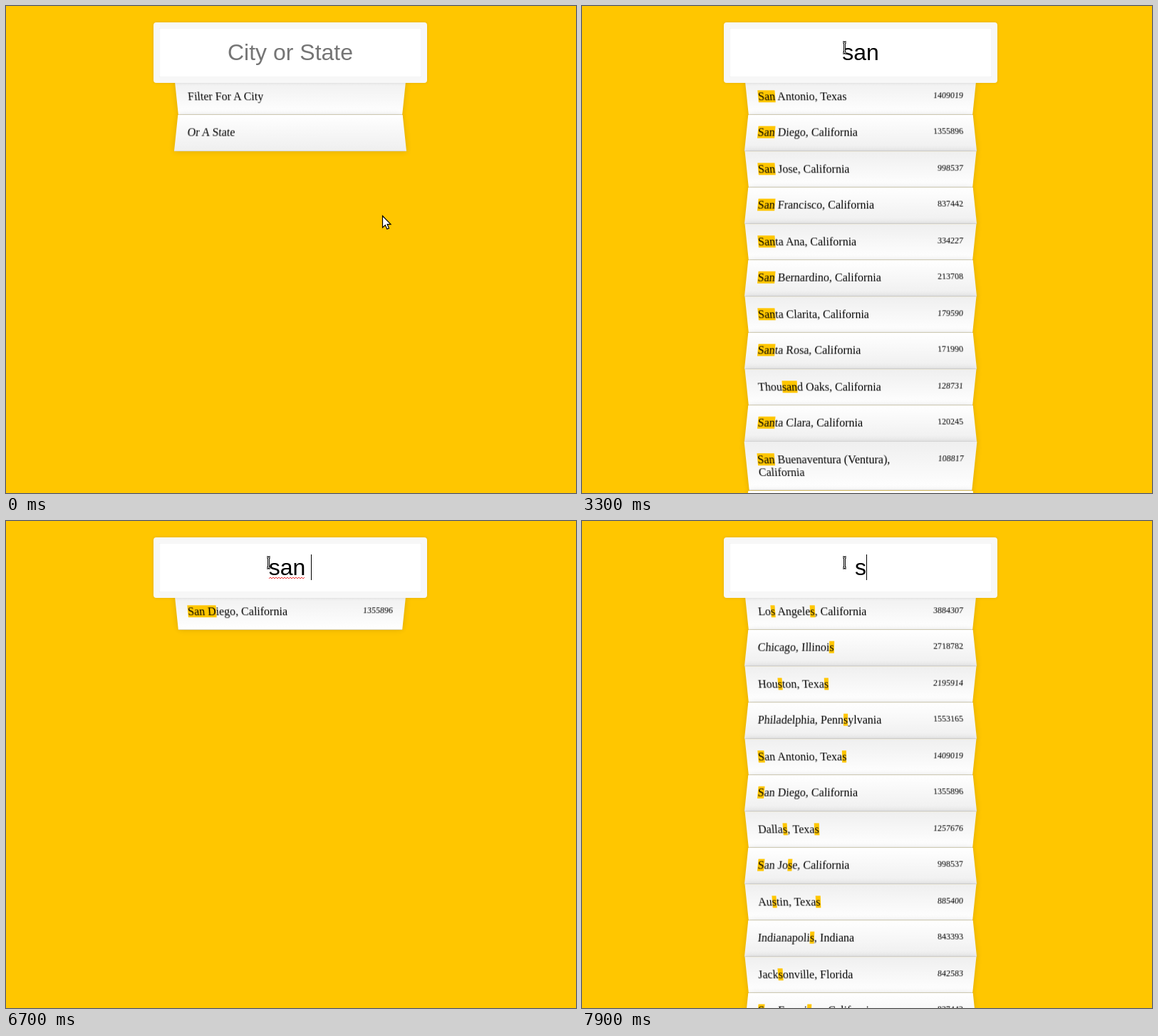
These frames come from a looping animation (800 by 684 pixels, 8 s). An HTML page:

```html
<!DOCTYPE html>
<html lang="en">
<head>
<meta charset="utf-8">
<title>City search</title>
<style>
  * { box-sizing: border-box; }
  html, body { margin: 0; width: 100%; height: 100%; overflow: hidden; background: #ffc600; }
  #stage { position: absolute; left: 0; top: 0; width: 800px; height: 684px; overflow: hidden; }
  #page { position: absolute; left: 0; top: 0; width: 798px; height: 684px; }
  #field {
    position: absolute; z-index: 2; left: 207px; top: 23px; width: 384px; height: 85px;
    background: #fff; border: 8px solid #f7f7f7; border-radius: 4px;
    box-shadow: 0 0 4px rgba(0,0,0,.12), inset 0 0 1.6px rgba(0,0,0,.19);
  }
  #typed {
    position: absolute; z-index: 3; top: 47px; white-space: pre;
    font: 32px/37px "Liberation Sans", Arial, sans-serif; color: #000;
  }
  #typed.empty { color: #757575; }
  #caret { position: absolute; z-index: 3; top: 47px; width: 1px; height: 36px; background: #000; }
  #wave { position: absolute; left: 0; top: 31px; width: 52px; height: 4px; }
  #list {
    position: absolute; left: 239px; top: 100px; width: 320px; margin: 0; padding: 0;
    list-style: none; font: 16px/18px "Liberation Serif", Times, serif; color: #000;
  }
  li {
    display: flex; justify-content: space-between; padding: 16px;
    border-bottom: 1px solid #d8d8d8; box-shadow: 0 0 8px rgba(0,0,0,.14);
  }
  li:nth-child(odd) {
    transform: perspective(80px) rotateX(-3deg) translateY(2.4px);
    background: linear-gradient(to top, #fff, #efefef);
  }
  li:nth-child(even) {
    transform: perspective(80px) rotateX(3deg) translateY(1.6px) scale(1.001);
    background: linear-gradient(to bottom, #fff, #efefef);
  }
  .name { white-space: nowrap; }
  .count { font-size: 12px; line-height: normal; }
  .hl { background: #ffc600; }
  #pointer { position: absolute; z-index: 4; left: 0; top: 0; }
</style>
</head>
<body>
<div id="stage">
  <div id="page">
    <div id="field"></div>
    <div id="typed"></div>
    <div id="caret"></div>
    <ul id="list"></ul>
  </div>
  <svg id="pointer" width="800" height="684" fill="none">
    <path id="arrow" d="M.5 .8V17.2L4.3 13.7L6.8 19.3L9.5 18.1L7.1 12.6H12Z" fill="#fff" stroke="#000" stroke-width="1.2"/>
    <g id="beam">
      <path d="M-2.5 -7H-1L0 -6L1 -7H2.5M0 -6V7M-2.5 8H-1L0 7L1 8H2.5" stroke="#000" stroke-width="3"/>
      <path d="M-2.5 -7H-1L0 -6L1 -7H2.5M0 -6V7M-2.5 8H-1L0 7L1 8H2.5" stroke="#fff" stroke-width="1"/>
    </g>
  </svg>
</div>
<script>
const LOOP = 8000;
const $ = id => document.getElementById(id);

// Sorted by population
const cities = `Los Angeles, California|3884307
Chicago, Illinois|2718782
Houston, Texas|2195914
Philadelphia, Pennsylvania|1553165
San Antonio, Texas|1409019
San Diego, California|1355896
Dallas, Texas|1257676
San Jose, California|998537
Austin, Texas|885400
Indianapolis, Indiana|843393
Jacksonville, Florida|842583
San Francisco, California|837442
Sacramento, California|479686
Kansas City, Missouri|467007
Mesa, Arizona|457587
Tulsa, Oklahoma|398121
Wichita, Kansas|386552
Santa Ana, California|334227
Chesapeake, Virginia|230571
San Bernardino, California|213708
Santa Clarita, California|179590
Santa Rosa, California|171990
Thousand Oaks, California|128731
Santa Clara, California|120245
San Buenaventura (Ventura), California|108817
Santa Maria, California|102216
San Mateo, California|101128
San Angelo, Texas|97492
San Marcos, California|89387
San Leandro, California|87965
San Ramon, California|74513
San Rafael, California|58994`.split('\n').map(row => row.split('|'));

// [ms, typed text, filtered query, caret shown]
const steps = [
  [0, '', '', 0], [900, '', '', 1], [1500, '', '', 0],
  [1700, 's', '', 1], [1900, 's', 's', 1],
  [2100, 'sa', 's', 1], [2200, 'sa', 'sa', 1],
  [2700, 'san', 'sa', 1], [2800, 'san', 'san', 1],
  [3300, 'san', 'san', 0], [3900, 'san', 'san', 1],
  [4100, 'san ', 'san ', 1], [4700, 'san ', 'san ', 0],
  [4900, 'san d', 'san ', 1], [5000, 'san di', 'san d', 1],
  [5100, 'san di', 'san di', 1], [5200, 'san die', 'san di', 1],
  [5300, 'san dieg', 'san die', 1], [5400, 'san dieg', 'san dieg', 1],
  [5900, 'san dieg', 'san dieg', 0],
  [6200, 'san die', 'san dieg', 1], [6300, 'san die', 'san die', 1],
  [6400, 'san di', 'san die', 1], [6500, 'san d', 'san di', 1],
  [6600, 'san d', 'san d', 1], [6700, 'san ', 'san d', 1],
  [6800, 'san ', 'san ', 1], [6900, 'san', 'san ', 1],
  [7000, 'san', 'san', 1], [7100, 'san', 'san', 0],
  [7400, 'sa', 'san', 0], [7500, 'sa', 'sa', 0],
  [7700, 'sa', 'sa', 1], [7800, 's', 'sa', 1], [7900, 's', 's', 1]
];

const caretNudge = { 'san': 1, 'san ': -1 };

let zigzag = 'M0 3';
for (let x = 2; x <= 50; x += 2) zigzag += `L${x} ${x % 4 ? 1 : 3}`;
const wave = `<svg id="wave"><path d="${zigzag}" fill="none" stroke="#f03030" stroke-width="1"/></svg>`;

const item = (name, count = '') =>
  `<li><span class="name">${name}</span><span class="count">${count}</span></li>`;

function find(query) {
  const match = new RegExp(query, 'gi');
  return cities.filter(([name]) => name.search(match) >= 0).slice(0, 12)
    .map(([name, count]) => item(
      name.replace('), ', '),\n').replace(match, '<span class="hl">$&</span>').replace('\n', '<br>'),
      count));
}

let shownQuery = null, shownStep = null;

function drawStep(step) {
  const [, text, query, caret] = step;
  if (query !== shownQuery) {
    const rows = query ? find(query) : [item('Filter For A City'), item('Or A State')];
    $('list').innerHTML = rows.join('');
    // A long list brings a scrollbar, which moves the centre
    $('page').style.left = rows.length > 9 ? '-8px' : '0';
    shownQuery = query;
  }
  const typed = $('typed');
  typed.className = text ? '' : 'empty';
  typed.textContent = text || 'City or State';
  const width = typed.getBoundingClientRect().width;
  typed.style.left = 399 - width / 2 + 'px';
  if (text.startsWith('san ')) typed.insertAdjacentHTML('beforeend', wave);
  const end = Math.floor(399 + (text ? width / 2 : 0) + .01) + (caretNudge[text] || 0);
  $('caret').style.left = end + 'px';
  $('caret').style.visibility = caret ? 'visible' : 'hidden';
}

function drawPointer(t) {
  const n = Math.min(5, Math.max(0, Math.floor((t - 200) / 100))) / 5;
  const p = n * n * (3 - 2 * n);
  const x = 528 - 159.5 * p, y = 294 - 236 * p;
  const overField = y < 108;
  $('arrow').style.display = overField ? 'none' : '';
  $('beam').style.display = overField ? '' : 'none';
  $(overField ? 'beam' : 'arrow').setAttribute('transform', `translate(${x} ${y})`);
}

function render(t) {
  const step = steps.filter(s => s[0] <= t).pop();
  if (step !== shownStep) drawStep(shownStep = step);
  drawPointer(t);
}

const start = performance.now();
function tick() {
  render((performance.now() - start) % LOOP);
  requestAnimationFrame(tick);
}
tick();
</script>
</body>
</html>
```
